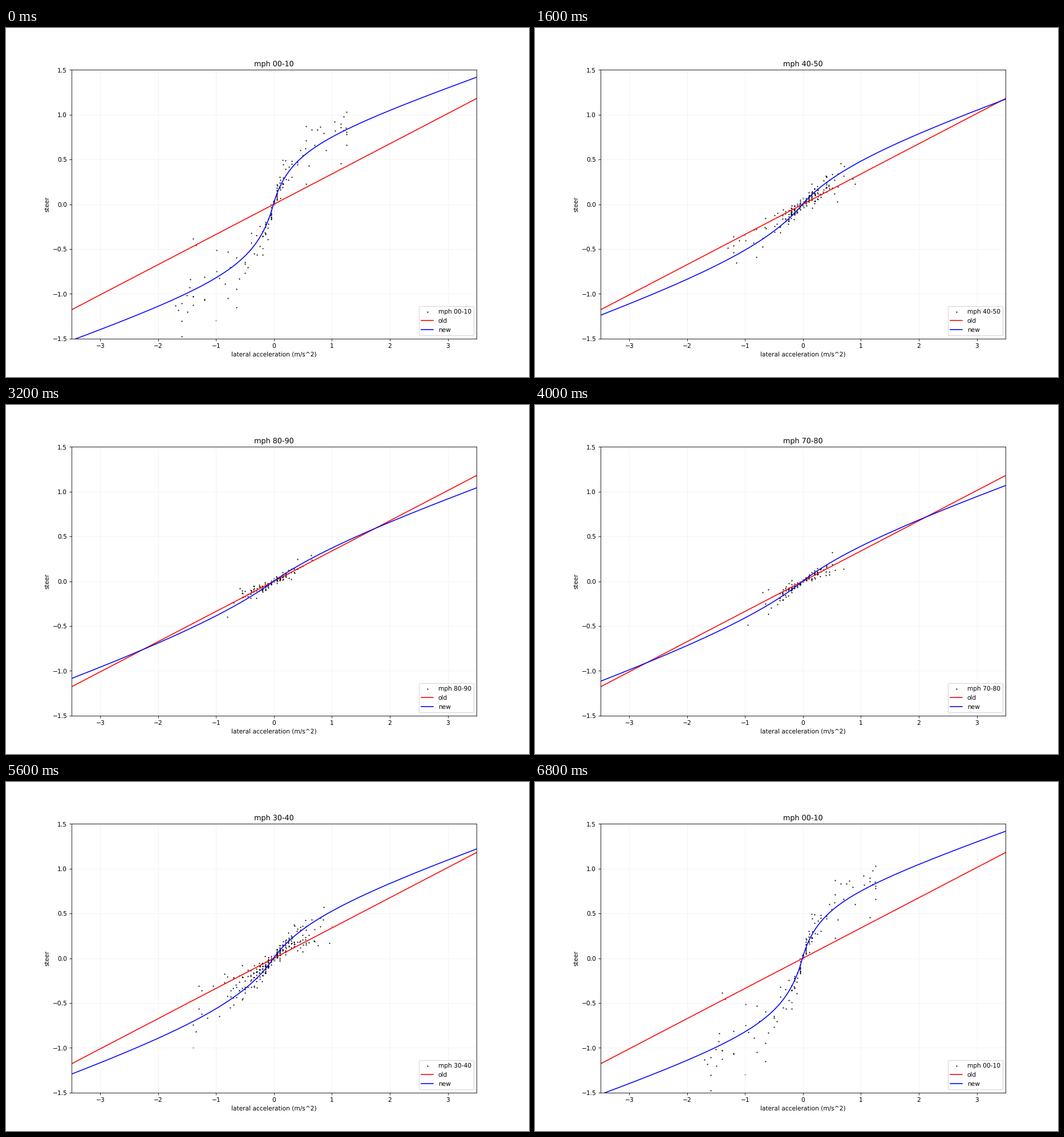
Recreate the animation shown at these times as a matplotlib script. Size 917 px wide and 611 px high, loop 7200 ms.

```python
import numpy as np
import matplotlib.pyplot as plt
from matplotlib.animation import FuncAnimation

DPI = 76.4
WIDTH, HEIGHT = 917, 611
BINS = 9
STEP_MS = 400

plt.rcParams["text.hinting"] = "none"


def fit(x, k):
    """Saturating curve plus a linear term; it flattens as the speed bin k rises."""
    z = x + .012
    right = z > 0
    slope = (.49 + .25 * k + .027 * k ** 2) * np.where(right, 1, .94)
    ceil = np.where(right, 1.403 + .132 * k, 1.2 + .103 * k)
    return z / (slope + ceil * np.abs(z)) + .22 * x


def cloud(k):
    """Dense core around zero with a wide, left-leaning tail."""
    rng = np.random.default_rng(40 + k)
    n = int(125 + 140 * np.exp(-((k - 2.5) / 1.8) ** 2))
    core = .32 - .2 * np.exp(-k) - .01 * k
    tail = .08 + .45 * np.exp(-k / 3)
    reach = 1.7 - .1 * k
    x = np.where(rng.random(n) < tail,
                 rng.uniform(-reach, .75 * reach, n),
                 rng.normal(0, core, n))
    # Lateral acceleration is logged in steps of 0.05.
    x = np.round(x / .05) * .05 + rng.uniform(-.006, .006, n)
    gain = .8 + .3 * np.exp(-k)
    spread = .24 * np.exp(-.13 * k) * (.15 + np.minimum(np.abs(x), .8))
    y = gain * fit(x, k) + rng.normal(0, spread)
    return np.column_stack([x, y])


def name(k):
    return f"mph {k}0-{k + 1}0"


xs = np.linspace(-3.5, 3.5, 1401)
points = [cloud(k) for k in range(BINS)]
curves = [fit(xs, k) for k in range(BINS)]

fig, ax = plt.subplots(figsize=((WIDTH + .001) / DPI, (HEIGHT + .001) / DPI), dpi=DPI)
dots = ax.scatter(*points[0].T, s=1, color="black", label=name(0))
ax.plot(xs, .3372 * xs + .001, color="red", label="old")
new, = ax.plot(xs, curves[0], color="blue", label="new")
title = ax.set_title(name(0))
ax.set_xlabel("lateral acceleration (m/s^2)")
ax.set_ylabel("steer")
ax.set_xlim(-3.5, 3.5)
ax.set_ylim(-1.5, 1.5)
ax.grid(color="0.95")
label = ax.legend(loc="lower right").get_texts()[0]


def update(i):
    # Sweep up through the speed bins and back down.
    k = min(i, 2 * BINS - 1 - i)
    dots.set_offsets(points[k])
    new.set_ydata(curves[k])
    title.set_text(name(k))
    label.set_text(name(k))
    return dots, new, title, label


anim = FuncAnimation(fig, update, frames=2 * BINS, interval=STEP_MS,
                     repeat=True, repeat_delay=0, blit=False)
plt.show()
```
